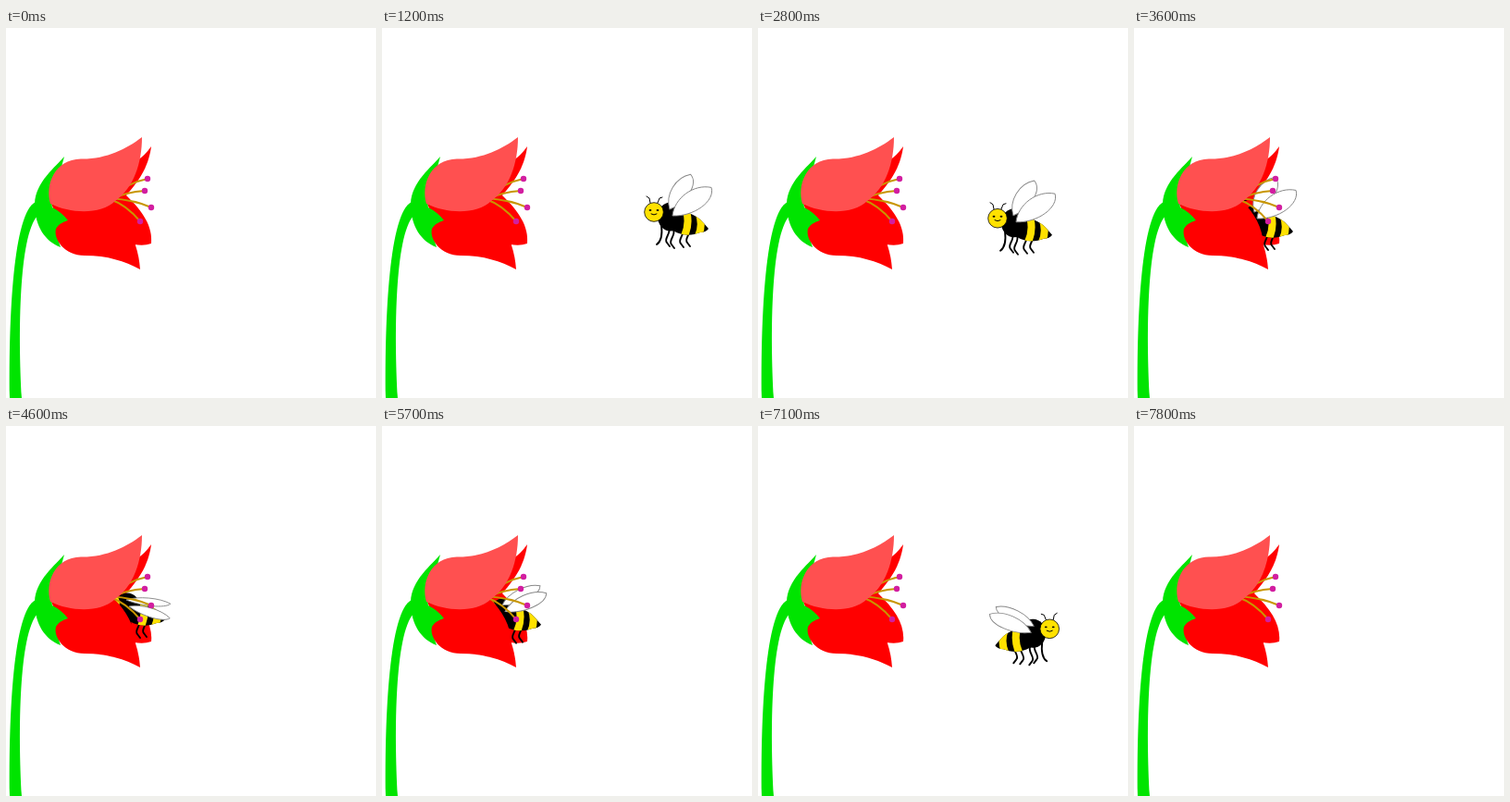
Animation of 400x400 px, one loop 8.3 s. Source, as an HTML page:

```html
<!DOCTYPE html>
<html lang="en">
<head>
<meta charset="utf-8">
<title>Bee visiting a flower</title>
<style>
  html, body { margin: 0; width: 100%; height: 100%; overflow: hidden; background: #fff; }
  svg { display: block; width: 100%; height: 100%; }
  .line { fill: none; stroke: #000; stroke-linecap: round; }
  .wing { fill: #fff; stroke: #888; stroke-width: .9; }
</style>
</head>
<body>
<svg viewBox="0 0 400 400">
  <defs>
    <clipPath id="abdomen"><path d="M18 5C28 -4 42 1 50 8Q54 12 59 18Q56 22 50 22C40 26 28 26 18 18Z"/></clipPath>
    <path id="leg" d="M-1 -20C2 -14 -7 -8 -3 -4L0 0"/>
    <circle id="anther" r="3.2"/>
  </defs>

  <path fill="#f00" d="M157 128Q150 138 142 143L48 188L60 215L139 234Q149 236 157 233C159 215 148 198 130 181C142 167 154 152 157 128Z"/>

  <g id="bee">
    <g class="line" stroke-width="1.9">
      <path d="M8 14Q10 30 3 35"/>
      <use href="#leg" x="17" y="37"/>
      <use href="#leg" x="22" y="39"/>
      <use href="#leg" x="32" y="38"/>
      <use href="#leg" x="39" y="37"/>
    </g>
    <g clip-path="url(#abdomen)">
      <rect x="10" y="-5" width="55" height="35"/>
      <path fill="none" stroke="#ffe100" stroke-width="8" d="M34 -4Q40 12 32 28M48 0Q54 14 47 28"/>
    </g>
    <ellipse cx="18" cy="5" rx="14" ry="15.5"/>
    <path id="rear" class="wing"/>
    <path id="front" class="wing"/>
    <circle r="10.3" fill="#ffe100" stroke="#000" stroke-width=".8"/>
    <path class="line" d="M-4 -10L-5 -15L-8 -17M4 -10L6 -15L9 -16M-3 2Q0 4 3 2"/>
    <ellipse cx="-4" cy="-2" rx="1.4" ry=".9"/>
    <ellipse cx="4" cy="-2" rx="1.4" ry=".9"/>
  </g>

  <g fill="#00e400">
    <path d="M4 400C3 310 8 200 32 188L34 203C14 225 13 330 17 400Z"/>
    <path d="M63 139C54 150 32 166 31 190C31 215 43 231 59 237L54 222L67 208Q60 199 50 194L48 180L60 150Z"/>
  </g>
  <path fill="#f00" d="M67 208Q57 211 54 217C51 228 63 246 85 246C110 246 128 252 145 261Q144 247 140 235C139 215 130 200 117 187L90 190Z"/>

  <path fill="none" stroke="#c89600" stroke-width="2" d="M112 184Q132 167 153 163M112 186Q130 177 150 176M112 184Q140 186 157 194M112 185Q130 191 145 209"/>
  <g fill="#d21ea0">
    <use href="#anther" x="153" y="163"/>
    <use href="#anther" x="150" y="176"/>
    <use href="#anther" x="157" y="194"/>
    <use href="#anther" x="145" y="209"/>
  </g>
  <path fill="#ff5050" d="M147 118C147 146 138 173 118 187C103 202 70 201 48 190C42 170 52 142 81 141.5C108 142 130 131 147 118Z"/>
</svg>
<script>
const LOOP = 8300, STEP = 100;
const ENTER = 800, LAND = 3400, LEAVE = 6200, GONE = 7800;
const [bee, rear, front] = ["bee", "rear", "front"].map(id => document.getElementById(id));

const progress = (t, from, to) => Math.min(1, Math.max(0, (t - from) / (to - from)));

// In from the right, once round a clockwise loop, then down to the flower
function arrive(t) {
  const left = 294, right = 339, middle = 154.5, radius = 44.5;
  if (t < 2500) {
    const turn = Math.PI * (progress(t, 1200, 1700) + progress(t, 1900, 2500));
    const x = left + 100 * (1 - progress(t, ENTER, 1200)) + (right - left) * progress(t, 1700, 1900);
    return [x - radius * Math.sin(turn), middle + radius * Math.cos(turn)];
  }
  const dip = Math.sin(Math.PI * progress(t, 2500, LAND)) ** 2;
  return [Math.max(113, 340 - 0.27 * (t - 2500)), 199 + 9 * dip];
}

function feed(t) {
  return [113, 195.5 + 6.5 * Math.cos((t - 3600) / 2700 * 2 * Math.PI)];
}

// Out to the right along a shallow dip
function depart(t) {
  const s = (t - 6600) / 1000;
  return [190 + 258 * s - 15 * s * s, 226 - 167 * (s - 0.3) ** 2];
}

function shapeWing(wing, x, y, angle, length, width) {
  wing.setAttribute("d", `M0 0C${length * 0.25} ${-width} ${length * 0.75} ${-width} ${length} 0C${length * 0.9} ${width} ${length * 0.35} ${width} 0 0Z`);
  wing.setAttribute("transform", `translate(${x} ${y}) rotate(${angle})`);
}

function draw(t) {
  // The turn towards the exit happens out of sight inside the flower
  const visible = t >= ENTER && t < GONE && t !== LEAVE;
  bee.style.display = visible ? "" : "none";
  if (!visible) return;

  const [x, y] = (t < LAND ? arrive : t < LEAVE ? feed : depart)(t);
  bee.setAttribute("transform", `translate(${x} ${y}) scale(${t < LEAVE ? 1 : -1} 1)`);

  // lift runs 1, 0, -1, 0
  const lift = Math.cos((t - ENTER) / STEP * Math.PI / 2);
  shapeWing(rear, 17, -3, -27 - 32 * lift, 46 - 2 * lift, 9 + 3.5 * lift);
  shapeWing(front, 20, 4, -18 - 26 * lift + 8 * Math.abs(lift) - 6 * (1 - Math.abs(lift)), 49 + 3 * lift, 10.5 + 4 * lift);
}

function tick() {
  draw(Math.floor(performance.now() % LOOP / STEP) * STEP);
  requestAnimationFrame(tick);
}
tick();
</script>
</body>
</html>
```
